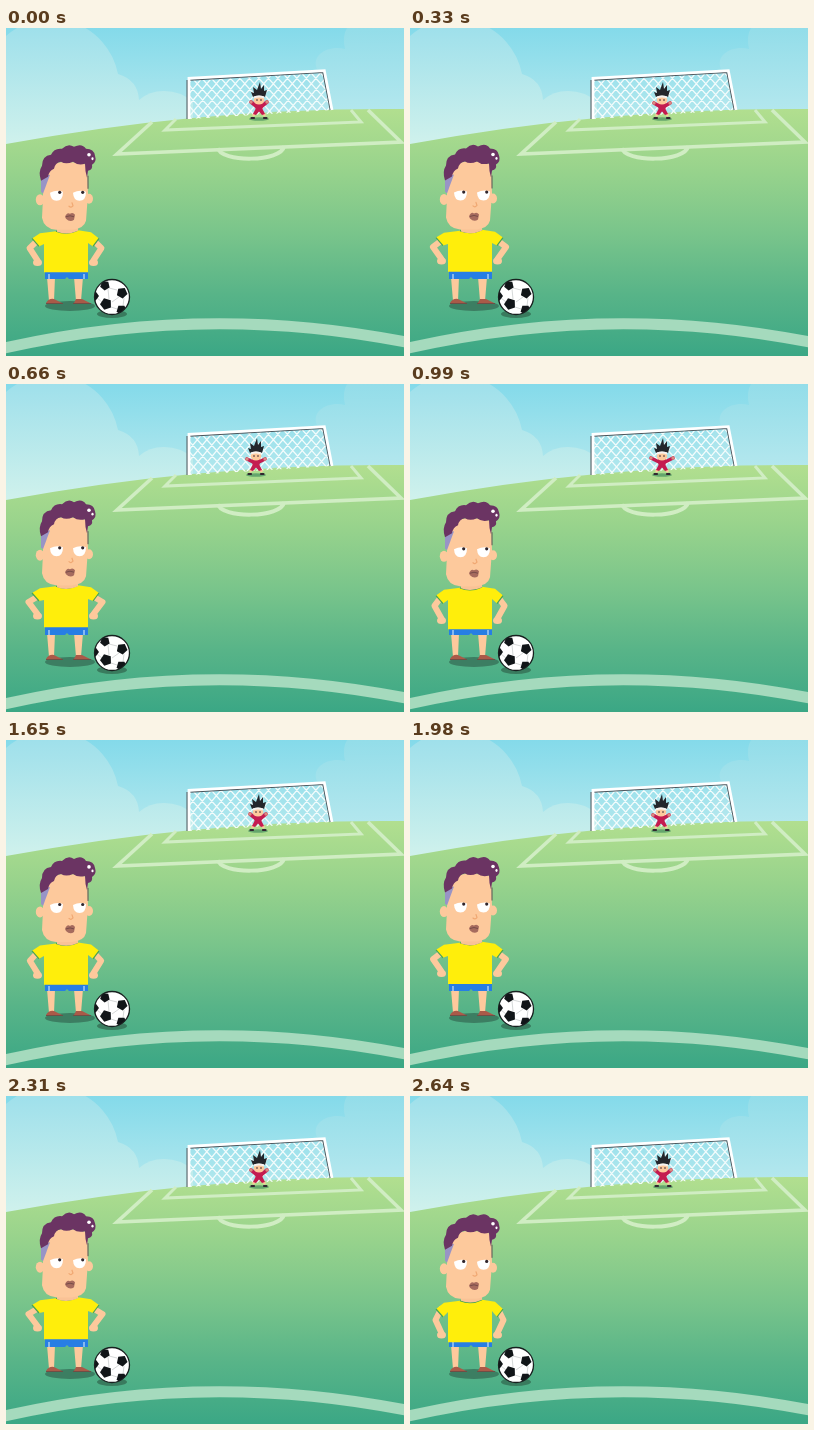
Animation, 398 px wide and 328 px high, one loop 2.97 s. Source, as an HTML page with a canvas:

```html
<!DOCTYPE html>
<html lang="en">
<head>
<meta charset="utf-8">
<title>Penalty kick</title>
<style>
html, body { margin: 0; width: 100%; height: 100%; overflow: hidden; }
canvas { display: block; width: 398px; height: 328px; }
</style>
</head>
<body>
<canvas id="stage" width="398" height="328"></canvas>
<script>
const ctx = document.getElementById('stage').getContext('2d');
const STEP = 330, LOOP = 2970;
const SKIN = '#fdc99c', HAIR = '#6b3463', SHIRT = '#ffee0b', KIT = '#c41c50';

// Player lift: positive is a breath in
const LIFT = [0.3, 0.7, 1, -0.3, -0.6, 0.1, 0.6, 1, -1];
// Keeper: sideways shift, hand reach, hand height
const KEEPER = [
  [0, 8, 74], [-1, 8, 75], [-3, 9, 75], [-1, 11, 74], [1, 13, 73],
  [-1, 8, 74], [-2, 8, 75], [0, 8, 74], [0, 8, 74]
];

function fill(d, color) {
  ctx.fillStyle = color;
  ctx.fill(new Path2D(d));
}
function line(d, color, width, cap = 'butt', join = 'miter') {
  ctx.strokeStyle = color;
  ctx.lineWidth = width;
  ctx.lineCap = cap;
  ctx.lineJoin = join;
  ctx.stroke(new Path2D(d));
}
function oval(x, y, rx, ry, color) {
  ctx.fillStyle = color;
  ctx.beginPath();
  ctx.ellipse(x, y, rx, ry, 0, 0, Math.PI * 2);
  ctx.fill();
}
function pentagon(x, y, r, turn) {
  ctx.fillStyle = '#111518';
  ctx.beginPath();
  for (let i = 0; i < 5; i++) {
    const a = turn + i * Math.PI * 0.4;
    ctx.lineTo(x + r * Math.cos(a), y + r * Math.sin(a));
  }
  ctx.fill();
}
function fade(y0, y1, ...colors) {
  const g = ctx.createLinearGradient(0, y0, 0, y1);
  colors.forEach((c, i) => g.addColorStop(i / (colors.length - 1), c));
  return g;
}

function sky() {
  ctx.fillStyle = fade(0, 110, '#84daea', '#bdebee');
  ctx.fillRect(0, 0, 398, 328);
  const cloud = fade(0, 115, '#9fe0eb', '#cff1ec');
  fill('M133 110V72Q143 63 158 63Q175 63 187 74V110Z', cloud);
  fill('M0 8A68 68 0 0 1 112 46Q132 52 133 72V120H0Z', cloud);
  const far = fade(0, 90, '#93dde9', '#b6e8ee');
  fill('M303 90V46Q307 41 311 41C305 27 322 17 339 21Q336 8 341 0H398V90Z', far);
}

function pitch() {
  fill('M0 116Q200 79 398 81V328H0Z',
    fade(80, 328, '#b2df8f', '#98d38c', '#7ac58b', '#58b488', '#3ba785'));
  const chalk = '#d0edc3';
  line('M146 94L111 126L395 114L362 82', chalk, 3.6);
  line('M170 91L159 102L355 94L345 82', chalk, 3);
  line('M212 120C214 134.5 276 134.5 278 118', chalk, 4);
  line('M-4 320.5Q200 274 402 314.5', '#a5dabd', 11);
}

function goal() {
  ctx.save();
  ctx.clip(new Path2D('M184 51L317 44L325 82L184 91Z'));
  let net = '';
  for (let x = 120; x < 380; x += 9.5) {
    net += `M${x} 40l50 55M${x + 18} 40l-46 55`;
  }
  line(net, '#f3fcfc', 1.3);
  ctx.restore();
  line('M181.2 91V52M184 52L317 44.4L324.4 82', '#4d575d', 1.4);
  line('M183 91V50.3L318.3 42.6L326 82', '#fff', 2.8);
}

function keeper([dx, reach, handY]) {
  oval(253 + dx, 91, 10, 1.8, '#65a66d');
  ctx.save();
  ctx.translate(253 + dx, 0);
  line('M-2 82L-6 88M2 82L6 88', SKIN, 2.4);
  line('M-7.5 90H-5M5 90H7.5', '#30272f', 2.2, 'round');
  line(`M-3 78L${-reach} ${handY}M3 78L${reach} ${handY}`, KIT, 3.6, 'round');
  oval(-reach, handY, 1.7, 1.7, '#d98a80');
  oval(reach, handY, 1.7, 1.7, '#d98a80');
  fill('M-4 75H4L3.5 81L6 86L3 87L0 83.5L-3 87L-6 86L-3.5 81Z', KIT);
  oval(0, 72, 5.3, 4.6, SKIN);
  fill('M-6 69L-8 64L-5 65L-6 59L-2 62L1 54L2 61L5 57L5 63L8 62L6 69Q0 66-6 69Z', '#24262b');
  line('M-5 69.5Q0 67.5 5 69.5', '#f7f2ef', 2);
  line('M-3 72H-1M1 72H3', '#493039', 1);
  ctx.restore();
}

function ball() {
  oval(106, 286, 15, 4, '#397b5e');
  ctx.save();
  ctx.translate(106, 269);
  oval(0, 0, 17.6, 17.6, '#fff');
  ctx.clip(new Path2D('M-17.6 0A17.6 17.6 0 1 0 17.6 0A17.6 17.6 0 1 0-17.6 0Z'));
  line('M-4-8L-3 2M-3-9L5-7M7 0L0 5M12 1L11 9M-1 10L5 12M-10 5L-15 1', '#c3c7c8', 0.7);
  pentagon(-7, -11.5, 5, 0.4);
  pentagon(10, -4, 5.6, 0.2);
  pentagon(-6, 7, 6, 0.6);
  pentagon(9.5, 13, 5.2, 0.3);
  pentagon(-18, -1, 5, 0);
  ctx.restore();
  ctx.strokeStyle = '#17201f';
  ctx.lineWidth = 1.3;
  ctx.beginPath();
  ctx.arc(106, 269, 17.5, 0, Math.PI * 2);
  ctx.stroke();
}

function legs() {
  oval(64, 278, 25, 5, '#3c7e62');
  fill('M41 249H49L48 273H43Z M68 249H77L75 273H70Z', SKIN);
  fill('M40 275Q43 270 48 271L56 275Z M68 275L70 271L76 271L84 275Z', '#aa5a48');
  line('M40 275.5H57M67 275.5H85', '#704e45', 1.2);
  fill('M39 240H82V251H63L61 249L59 251H39Z', '#277ee4');
  line('M43 246V251M78 246V251', '#e7f4fa', 1);
}

function arms(lift) {
  const ey = 221 - lift * 3, hy = 235.5 - lift * 3.5, out = lift * 1.5;
  const d = `M31 213L${24 - out} ${ey}L31.5 ${hy - 2}M88 213L${95 + out} ${ey}L87.5 ${hy - 2}`;
  line(d, SKIN, 6, 'round', 'round');
  oval(31.5, hy, 4.5, 3.5, SKIN);
  oval(87.5, hy, 4.5, 3.5, SKIN);
}

function shirt(lift) {
  const y = -lift * 1.2, tip = -lift * 2, hem = 244.8 - lift * 1.5;
  fill(`M50 ${203.5 + y}L34 ${205.5 + y}L26 ${211 + tip}L33 ${219 + tip}L38 216V${hem}H82V215
    L87 ${219 + tip}L93 ${211 + tip}L85 ${204.5 + y}L72 ${202.5 + y}Q61 ${208 + y} 50 ${203.5 + y}Z`, SHIRT);
  line(`M26 ${211 + tip}L33 ${219 + tip}M93 ${211 + tip}L87 ${219 + tip}
    M50 ${203.5 + y}Q61 ${208 + y} 72 ${202.5 + y}`, '#4ba354', 1.2);
}

function eye(x) {
  fill(`M${x - 6.5} 165Q${x} 161.5 ${x + 6.5} 164Q${x + 6.5} 173 ${x} 173Q${x - 6} 173 ${x - 6.5} 165Z`, '#fff');
  oval(x + 3.2, 164.6, 1.6, 1.6, '#30252b');
}

function head(lift) {
  ctx.save();
  ctx.translate(0, -lift * 0.8);
  fill('M51 194H72V203Q61 208 51 204Z', '#f9c296');
  oval(34, 172, 4.2, 5.5, SKIN);
  oval(83, 171, 4, 5, SKIN);
  fill('M37 140Q57 130 81 137L82 166L80 193Q78 201 66 202H50Q38 201 36 190L37 170Z', SKIN);
  fill('M35 149L44 147L37 166L35 164Z', '#9894c6');
  fill(`M35 153Q32 144 36 138Q36 128 45 127Q48 120 56 121Q62 115 68 119
    Q76 115 80 121Q88 121 89 128Q91 134 86 137Q87 142 82 143L81 150
    Q79 144 79 136Q72 138 67 134Q60 137 55 134Q49 135 48 141Q43 143 42 149Z`, HAIR);
  oval(83, 127, 1.8, 1.8, '#fff');
  oval(86.5, 131, 1.1, 1.4, '#fff');
  line('M82 148V161', '#4e3344', 0.8);
  eye(50.5);
  eye(73.5);
  line('M66 175L67 178Q65 180.5 63 178.5', '#f0a873', 1.2, 'round', 'round');
  fill('M59 189Q61 184 64 186Q67 184 69 187L68 192Q64 195 60 191Z', '#a66b5e');
  line('M60 189Q64 187 68 189', '#774b48', 1);
  ctx.restore();
}

function draw(time) {
  const step = Math.floor((time % LOOP) / STEP);
  const lift = LIFT[step];
  sky();
  pitch();
  goal();
  keeper(KEEPER[step]);
  legs();
  arms(lift);
  shirt(lift);
  head(lift);
  ball();
}

const start = performance.now();
function tick() {
  draw(performance.now() - start);
  requestAnimationFrame(tick);
}
tick();
</script>
</body>
</html>
```
